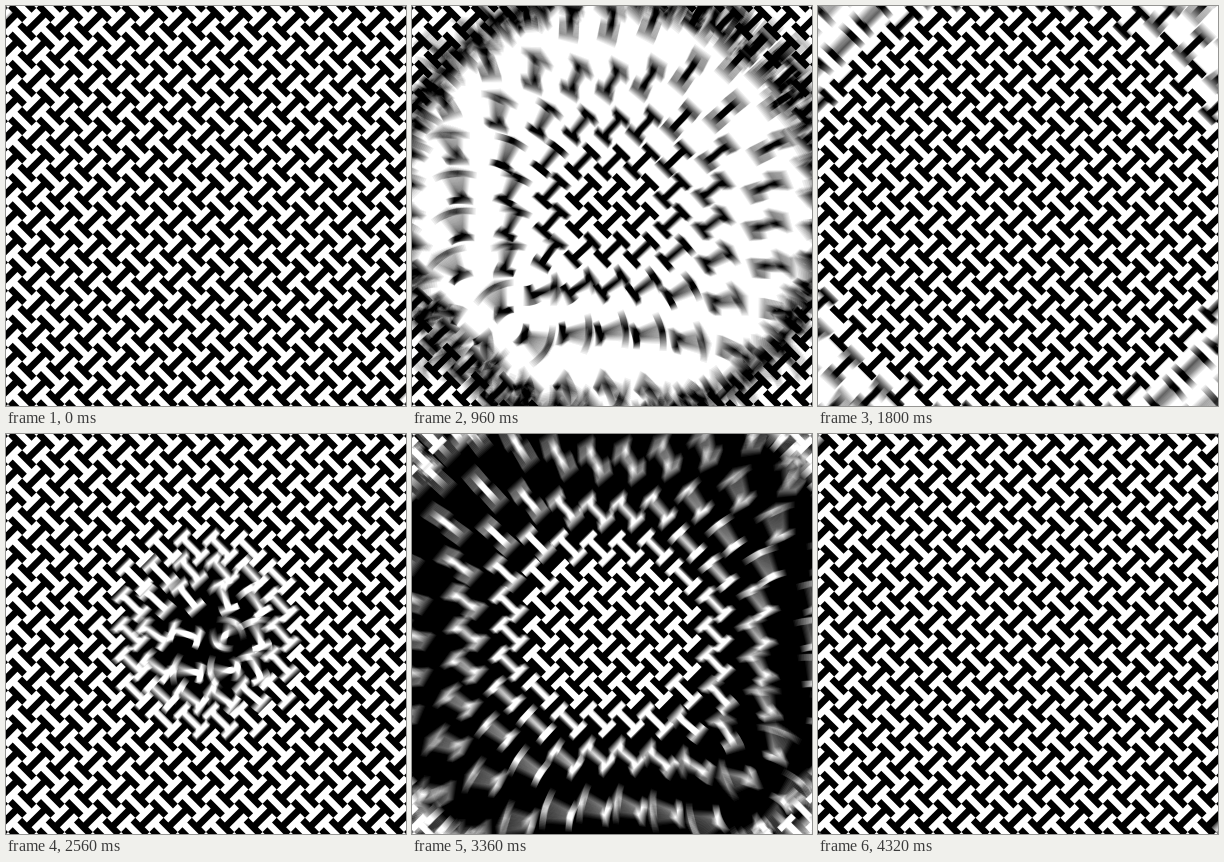
Write an HTML page with a canvas that moves like this. It is 400 by 400 pixels and loops after 4360 ms.

```html
<!DOCTYPE html>
<html lang="en">
<head>
<meta charset="utf-8">
<title>Woven ripple</title>
<style>
  html, body { margin: 0; width: 100%; height: 100%; overflow: hidden; background: #fff; }
  canvas { display: block; width: 400px; height: 400px; }
</style>
</head>
<body>
<canvas id="stage" width="400" height="400"></canvas>
<script>
const SIZE = 400, MID = SIZE / 2;
const LOOP = 4360, HALF = LOOP / 2, STEP = 40;
const UNIT = 20 / 3;               // stroke width of one I-shaped tile
const GRID = 3 * Math.SQRT2 * UNIT;
const REACH = 288, MOVE = 900, PEAK = 400;
const SPREAD = 0.6;
const SHUTTER = 90, SAMPLES = 18;  // motion blur

const stage = document.getElementById('stage').getContext('2d');
const layer = document.createElement('canvas');
layer.width = layer.height = SIZE;
const pen = layer.getContext('2d');

const tile = new Path2D();
[[-2.5, -1.5], [-1.5, -1.5], [-1.5, -0.5], [1.5, -0.5], [1.5, -1.5], [2.5, -1.5],
 [2.5, 1.5], [1.5, 1.5], [1.5, 0.5], [-1.5, 0.5], [-1.5, 1.5], [-2.5, 1.5]]
  .forEach(([x, y]) => tile.lineTo(x * UNIT, y * UNIT));
tile.closePath();

function makeSet(ink, paper, base, dx, dy) {
  const tiles = [];
  for (let i = -9; i <= 9; i++) {
    for (let j = -9; j <= 9; j++) {
      const x = (i + dx) * GRID, y = (j + dy) * GRID;
      if (Math.max(Math.abs(x), Math.abs(y)) > MID + GRID) continue;
      const angle = Math.atan2(y, x) - base;
      const turn = Math.atan2(Math.sin(angle), Math.cos(angle));
      const far = Math.min(1, Math.hypot(x, y) / REACH);
      tiles.push({ x, y, turn, delay: (HALF - MOVE) * Math.pow(far, 1.17) });
    }
  }
  return { ink, paper, base, tiles };
}

const sets = [
  makeSet('#000', '#fff', -Math.PI / 4, 0, 0.5),
  makeSet('#fff', '#000', -3 * Math.PI / 4, 0.5, 0)
];

// Quick push outwards, slower return.
function push(t) {
  if (t <= 0 || t >= MOVE) return 0;
  return t < PEAK
    ? Math.pow(t / PEAK, 2)
    : Math.pow((MOVE - t) / (MOVE - PEAK), 1.7);
}

function drawMoment(time) {
  const t = (time + LOOP) % LOOP;
  const set = sets[t < HALF ? 0 : 1];
  pen.setTransform(1, 0, 0, 1, 0, 0);
  pen.fillStyle = set.paper;
  pen.fillRect(0, 0, SIZE, SIZE);
  pen.fillStyle = set.ink;
  for (const p of set.tiles) {
    const k = push(t % HALF - p.delay);
    const scale = 1 + SPREAD * k;
    const angle = set.base + p.turn * Math.pow(k, 1.7);
    const c = Math.cos(angle), s = Math.sin(angle);
    pen.setTransform(c, s, -s, c, MID + p.x * scale, MID + p.y * scale);
    pen.fill(tile);
  }
}

function drawFrame(time) {
  for (let n = 0; n < SAMPLES; n++) {
    drawMoment(time + ((n + 0.5) / SAMPLES - 0.5) * SHUTTER);
    stage.globalAlpha = 1 / (n + 1);   // running average
    stage.drawImage(layer, 0, 0);
  }
}

const start = performance.now();
let shown = -1;
function tick() {
  const t = Math.max(0, performance.now() - start) % LOOP;
  const time = Math.floor(t / STEP) * STEP;
  if (time !== shown) {
    shown = time;
    drawFrame(time);
  }
  requestAnimationFrame(tick);
}
tick();
</script>
</body>
</html>
```
